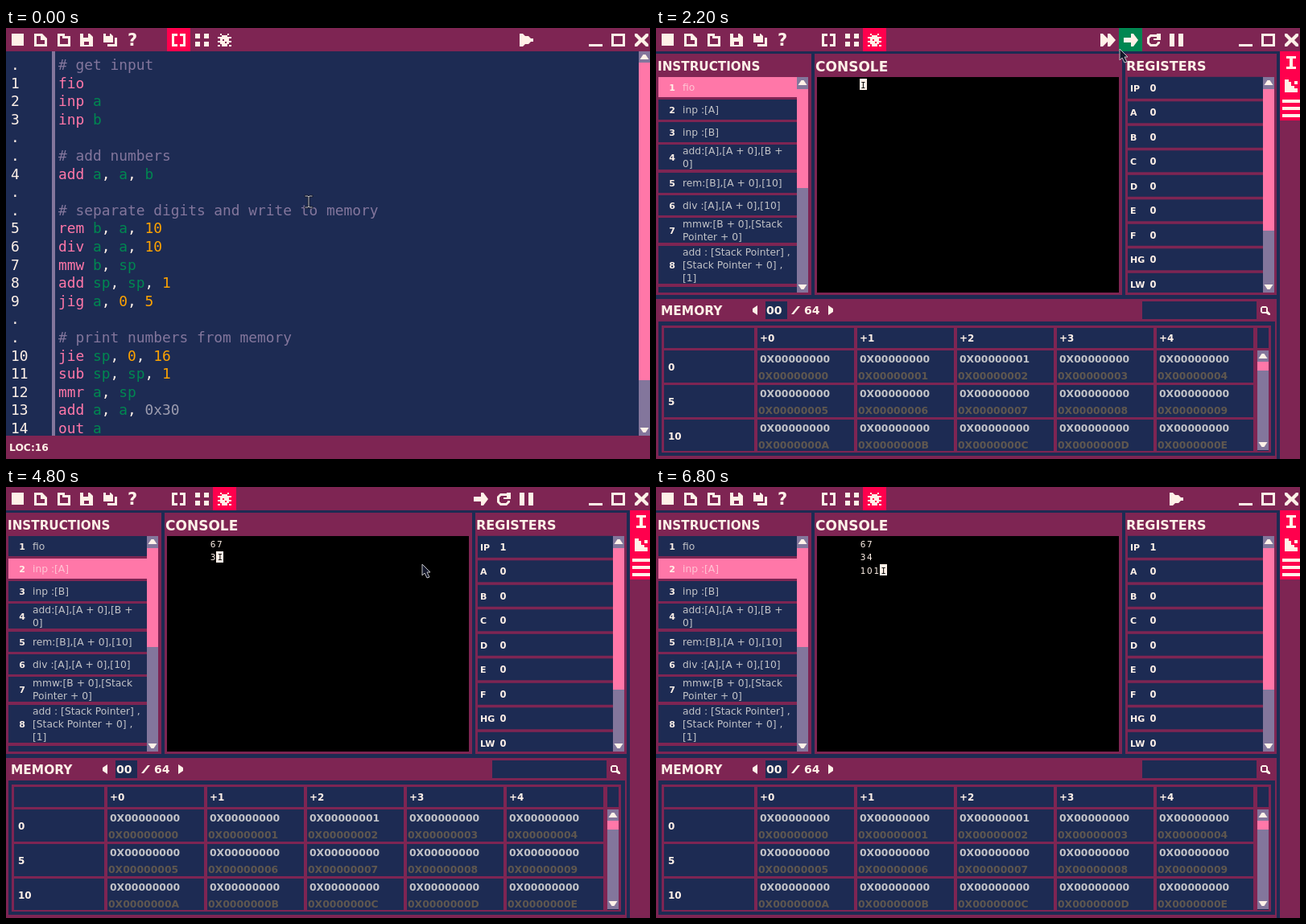
An HTML page with a canvas that plays this animation: 800x536 px, repeating every 6.9 s.

```html
<!DOCTYPE html>
<html lang="en">
<head>
<meta charset="utf-8">
<title>Assembly editor and debugger</title>
<style>
  html, body { margin: 0; width: 100%; height: 100%; overflow: hidden; background: #1d2b53; }
  canvas { display: block; width: 800px; height: 536px; }
</style>
</head>
<body>
<canvas id="stage" width="800" height="536"></canvas>
<script>
const ctx = document.getElementById('stage').getContext('2d');
const LOOP = 6900, STEP = 100;
const C = {
  plum: '#7e2553', navy: '#1d2b53', pink: '#ff77a8', red: '#ff004d', lavender: '#83769c',
  green: '#008751', orange: '#ffa300', cream: '#fff1e8', grey: '#c2c3c7', dim: '#5f574f',
  blue: '#29adff', pale: '#ffc4d4', black: '#000'
};
const MONO = '17.85px "DejaVu Sans Mono", monospace';
const sans = (size, bold = true) => `${bold ? 'bold ' : ''}${size}px "DejaVu Sans", sans-serif`;

function rect(x, y, w, h, color) {
  ctx.fillStyle = color;
  ctx.fillRect(x, y, w, h);
}
function text(str, x, y, font, color = C.cream, align = 'left') {
  ctx.font = font;
  ctx.fillStyle = color;
  ctx.textAlign = align;
  ctx.fillText(str, x, y);
}
function shape(d, x, y, color = C.cream, outline) {
  const path = new Path2D(d);
  ctx.save();
  ctx.translate(x, y);
  ctx.fillStyle = color;
  ctx.fill(path, 'evenodd');
  if (outline) {
    ctx.strokeStyle = outline;
    ctx.stroke(path);
  }
  ctx.restore();
}

const ICON = {
  file: 'M0 0h10l6 6v10H0zM3 3v10h10V8H8V3z',
  folder: 'M0 0h9v3h7v13H0zM3 3v10h10V6H6V3z',
  save: 'M0 0h12l4 4v12H0zM4 0v5h6V0zM5 10h6v4H5z',
  saveAll: 'M0 0h9l3 3v8H0zM3 0v3h5V0zM14 5h3v11H5v-3h9z',
  brackets: 'M0 0h7v3H3v10h4v3H0zM10 0h7v16h-7v-3h4V3h-4z',
  grid: 'M0 0h6v6H0zM11 0h6v6h-6zM0 10h6v6H0zM11 10h6v6h-6z',
  bug: 'M5 2h7v2h2v9h-2v3H5v-3H3V4h2zM6 7v2h2V7zM9 10v2h2v-2zM3 0h2v2H3zM12 0h2v2h-2z' +
       'M0 4h3v2H0zM0 9h3v2H0zM0 14h3v2H0zM14 4h3v2h-3zM14 9h3v2h-3zM14 14h3v2h-3z',
  forward: 'M0 0h3l6 6V0h3l7 8-7 8H9v-6l-6 6H0z',
  step: 'M0 5h9V0h3l6 8-6 8H9v-5H0z',
  restart: 'M4 1h8v3H5L3 6v5l2 2h6l2-2v-1h3v2l-4 4H4l-4-4V5zM12 0h5v8H8V6h4z',
  pause: 'M0 0h6v16H0zM11 0h6v16h-6z',
  play: 'M0 0h4l3 3h4l3 3h3v4h-3l-3 3H7l-3 3H0z',
  maximize: 'M0 0h17v16H0zM3 3v10h11V3z',
  close: 'M0 0h3l5.5 5.5L14 0h3v3l-5 5 5 5v3h-3l-5.5-5.5L3 16H0v-3l5-5-5-5z',
  search: 'M2 0h5l2 2v4l3 3v2h-2L7 9H2L0 7V2zM2 2v5h5V2z'
};
const ARROW = 'M0 0v14l3-3 3 6 3-1-3-6h4z';
const IBEAM = 'M-5-8h4l1 1 1-1h4v2H1V6h4v2H1L0 7l-1 1h-4V6h4V-6h-4z';

// Run buttons: [left edge, hover colour]
const BUTTON = {
  forward: [546, C.blue], step: [575, C.green], restart: [604, C.orange],
  pause: [632, C.red], play: [632, C.pink]
};

// Pointer stops: [time, x, y]
const POINTER = [
  [0, 376, 216], [700, 463, 229], [1100, 636, 17], [1400, 636, 17], [2000, 596, 24],
  [2200, 576, 26], [2400, 562, 20], [2600, 562, 20], [2900, 517, 96], [5900, 517, 96],
  [6600, 698, -12], [6800, 698, -18]
];
function pointerAt(t) {
  const next = POINTER.findIndex(p => p[0] > t);
  if (next < 0) return { x: 698, y: -18 };
  const [t0, x0, y0] = POINTER[next - 1], [t1, x1, y1] = POINTER[next];
  const k = (t - t0) / (t1 - t0), e = k * k * (3 - 2 * k);
  return { x: x0 + (x1 - x0) * e, y: y0 + (y1 - y0) * e };
}

const OPENED = 1400, RUNNING = 2400, DONE = 5300;
const TYPED = [
  [0, ''], [3700, '6'], [3900, '67'], [4200, '67\n'], [4800, '67\n3'],
  [5000, '67\n34'], [5200, '67\n34\n'], [DONE, '67\n34\n101']
];

const PROGRAM = `# get input
fio
inp a
inp b

# add numbers
add a, a, b

# separate digits and write to memory
rem b, a, 10
div a, a, 10
mmw b, sp
add sp, sp, 1
jig a, 0, 5

# print numbers from memory
jie sp, 0, 16
sub sp, sp, 1
mmr a, sp
add a, a, 0x30
out a`.split('\n');

// Instruction rows: [top, height, lines]
const INSTRUCTIONS = [
  [61, 25, ['fio']],
  [89, 25, ['inp :[A]']],
  [117, 25, ['inp :[B]']],
  [145, 31, ['add:[A],[A + 0],[B +', '0]']],
  [180, 25, ['rem:[B],[A + 0],[10]']],
  [208, 25, ['div :[A],[A + 0],[10]']],
  [236, 31, ['mmw:[B + 0],[Stack', 'Pointer + 0]']],
  [271, 47, ['add : [Stack Pointer] ,', '[Stack Pointer + 0] ,', '[1]']]
];

function scrollbar(x, y, h, thumbTop, thumbBottom) {
  rect(x, y, 14, h, C.lavender);
  rect(x, thumbTop, 14, thumbBottom - thumbTop, C.pink);
  shape('M-6 3h11L1-3h-3z', x + 7.5, y + 7);
  shape('M-6-3h11L1 3h-3z', x + 7.5, y + h - 7);
}

function toolbar(debugging, buttons, pointer) {
  rect(0, 0, 800, 29, C.plum);
  rect(7, 7, 15, 15, C.cream);
  shape(ICON.file, 35, 7);
  shape(ICON.folder, 64, 7);
  shape(ICON.save, 92, 7);
  shape(ICON.saveAll, 121, 7);
  text('?', 157, 22, sans(21), C.cream, 'center');
  rect(debugging ? 257 : 200, 0, 29, 29, C.red);
  shape(ICON.brackets, 206, 7);
  shape(ICON.grid, 235, 7);
  shape(ICON.bug, 263, 7);
  for (const name of buttons) {
    const [x, hover] = BUTTON[name];
    if (pointer.y >= 0 && pointer.y < 29 && pointer.x >= x && pointer.x < x + 29)
      rect(x, 0, 29, 29, hover);
    shape(ICON[name], x + 6, 7);
  }
  rect(724, 20, 17, 3, C.cream);
  shape(ICON.maximize, 752, 7);
  shape(ICON.close, 781, 7);
}

function tokenColor(token, first) {
  if (token[0] === '#') return C.lavender;
  if (token === ',') return C.cream;
  if (first) return C.pink;
  if (token.startsWith('0x')) return '#9c9caf';
  return /\d/.test(token) ? C.orange : C.green;
}

function editor() {
  let number = 0;
  ctx.font = MONO;
  const advance = ctx.measureText('0').width;
  rect(57, 29, 4, 478, C.lavender);
  PROGRAM.forEach((line, i) => {
    const y = 52 + 22.6 * i;
    text(/^\w/.test(line) ? ++number : '.', 6, y, MONO);
    for (const m of line.matchAll(/#.*|\w+|,/g))
      text(m[0], 65 + m.index * advance, y, MONO, tokenColor(m[0], m.index === 0));
  });
  scrollbar(786, 29, 478, 43, 438);
  rect(0, 507, 800, 29, C.plum);
  text('LOC:16', 4, 526, sans(12.3));
}

function instructions(active) {
  rect(0, 32, 193, 300, C.plum);
  text('INSTRUCTIONS', 2, 53, sans(15.2));
  INSTRUCTIONS.forEach(([top, height, lines], i) => {
    const middle = top + height / 2, on = i === active;
    rect(3, top, 172, height, on ? C.pink : C.navy);
    text(i + 1, 20, middle + 4.5, sans(11), C.cream, 'center');
    lines.forEach((line, j) => text(line, 33, middle + 4.5 + (j - (lines.length - 1) / 2) * 15.7,
      sans(12.3, false), on ? C.pale : C.grey));
  });
  rect(3, 322, 172, 7, C.navy);
  scrollbar(175, 61, 268, 76, 199);
}

function consolePanel(content) {
  const lines = content.split('\n'), cell = 8.4, font = sans(10.5, false);
  const lineY = row => 74.5 + row * 16.5;
  rect(197, 32, 382, 300, C.plum);
  text('CONSOLE', 198, 54, sans(17));
  rect(200, 61, 375, 268, C.black);
  lines.forEach((line, row) => [...line].forEach((ch, col) =>
    text(ch, 257 + col * cell, lineY(row), font, C.cream, 'center')));
  const row = lines.length - 1, x = 253 + lines[row].length * cell;
  rect(Math.round(x), Math.floor(lineY(row) - 11), 9, 14, C.cream);
  text('I', x + 4.5, lineY(row), '10.5px "DejaVu Sans Mono", monospace', C.black, 'center');
}

function registers(ip) {
  rect(583, 32, 188, 300, C.plum);
  text('REGISTERS', 584, 53, sans(16));
  ['IP', 'A', 'B', 'C', 'D', 'E', 'F', 'HG', 'LW'].forEach((name, i) => {
    const y = 60.8 + 30.5 * i;
    rect(586, y, 168, Math.min(27, 329 - y), C.navy);
    text(name, 589, y + 18, sans(11));
    text(i ? 0 : ip, 613.5, y + 18, sans(11.5));
  });
  scrollbar(754, 61, 268, 76, 252);
}

function memory() {
  const hex = n => '0X' + n.toString(16).toUpperCase().padStart(8, '0');
  rect(0, 337, 771, 199, C.plum);
  text('MEMORY', 6, 357, sans(15.4));
  shape('M6-6v12L0 2v-4z', 120, 351);
  rect(136, 340, 27, 22, C.navy);
  text('00', 137, 356, sans(14));
  shape('M8-5h3L3 5H0z', 168, 351);
  text('64', 184, 356, sans(14));
  shape('M0-6v12l6-4v-4z', 214, 351);
  rect(604, 340, 142, 22, C.navy);
  shape(ICON.search, 751, 346);

  rect(3, 365, 766, 167, C.navy);
  rect(7, 370, 757, 158, C.plum);
  const columns = [[10, 112], ...[0, 1, 2, 3, 4].map(i => [126 + 124 * i, 120]), [747, 14]];
  for (const [x, w] of columns) {
    rect(x, 373, w, 25, C.navy);
    for (let r = 0; r < 3; r++) rect(x, 401 + 43 * r, w, r < 2 ? 40 : 39, C.navy);
  }
  for (let r = 0; r < 3; r++) {
    text(5 * r, 15, 426 + 43 * r, sans(12));
    for (let c = 0; c < 5; c++) {
      const address = 5 * r + c, x = 129 + 124 * c, y = 416 + 43 * r;
      if (!r) text('+' + c, x, 390, sans(12));
      text(hex(address === 2 ? 1 : 0), x, y, sans(12.4), C.grey);
      text(hex(address), x - 2, y + 20.5, sans(12.4), C.dim);
    }
  }
  scrollbar(747, 401, 124, 415, 426);
}

function sidebar() {
  rect(775, 29, 25, 507, C.plum);
  rect(775, 29, 25, 86, C.red);
  shape('M0 0h12v3H8v10h4v3H0v-3h4V3H0z', 783, 35);
  shape('M0 0h5v3h3v5h4v3h4v5H0zM12 2h4v4h-4z', 781, 64);
  for (let i = 0; i < 3; i++) rect(778, 89 + 9 * i, 22, 4, C.cream);
}

function draw(t) {
  const pointer = pointerAt(t), debugging = t >= OPENED, started = t >= RUNNING;
  const buttons = !debugging || t >= DONE ? ['play']
    : [...(started ? [] : ['forward']), 'step', 'restart', 'pause'];
  rect(0, 0, 800, 536, C.navy);
  toolbar(debugging, buttons, pointer);
  if (debugging) {
    instructions(started ? 1 : 0);
    consolePanel(TYPED.findLast(([at]) => t >= at)[1]);
    registers(started ? 1 : 0);
    memory();
    sidebar();
  } else {
    editor();
  }
  const beam = !debugging && pointer.y > 29;
  shape(beam ? IBEAM : ARROW, Math.round(pointer.x), Math.round(pointer.y),
    beam ? C.grey : '#15182b', beam ? '#15182b' : C.grey);
}

let shown = -1;
function tick(now) {
  const t = Math.floor(now % LOOP / STEP) * STEP;
  if (t !== shown) draw(shown = t);
  requestAnimationFrame(tick);
}
draw(0);
requestAnimationFrame(tick);
</script>
</body>
</html>
```
